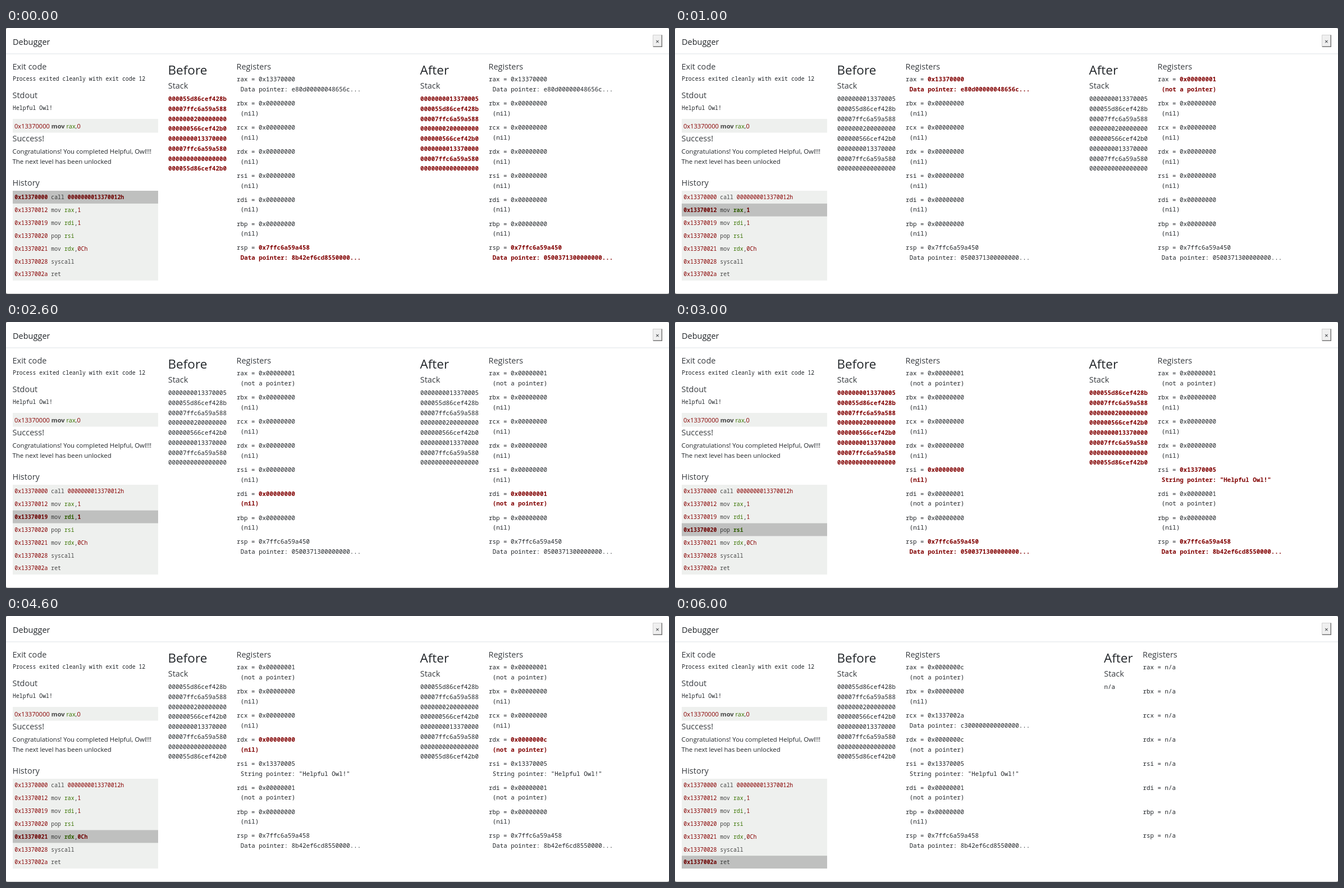
An HTML page that plays this animation: 1181 px wide and 474 px high, repeating every 7 s.

```html
<!DOCTYPE html>
<html lang="en">
<head>
<meta charset="utf-8">
<title>Debugger</title>
<style>
  html, body { margin: 0; width: 100%; height: 100%; overflow: hidden; background: #fff; }
  svg { display: block; }
  text { white-space: pre; fill: #212529; font: 11.45px "Open Sans", "Noto Sans", sans-serif; }
  .title { font-size: 14.5px; }
  .head { font-size: 14.5px; fill: #383c40; }
  .big { font-size: 22.5px; }
  .mono { font: 10.83px "Noto Sans Mono", "DejaVu Sans Mono", monospace; }
  .code { font: 9.85px "Noto Sans Mono", "DejaVu Sans Mono", monospace; }
  .asm { font-size: 11.1px; }
  .changed { font-weight: bold; fill: #800000; }
  .num { fill: #880000; }
  .reg { fill: #397300; }
  .op { fill: #444; }
  .bold, .active .num, .active .reg { font-weight: bold; }
</style>
</head>
<body>
<svg id="stage" width="1181" height="474" viewBox="0 0 1181 474">
  <rect width="1181" height="474" fill="#808080"/>
  <rect width="1181" height="473.5" rx="3" fill="#fff"/>
  <path d="M0 46H1181" stroke="#dee2e6"/>
  <rect x="1152" y="12" width="17" height="22" fill="#efefef"/>
  <path d="M1152.5 34V12.5H1169" fill="none" stroke="#d0d0d0"/>
  <path d="M1153 33.3H1168.3V12.5" fill="none" stroke="#767676" stroke-width="1.5"/>
  <g id="fixed"></g>
  <g id="live"></g>
</svg>
<script>
const STEP_MS = 1000;
const LINE = 17.75, REG_PITCH = 42.86, ROW = 22.86, HISTORY_TOP = 290;
const MESSAGE = "Helpful Owl!", LEVEL = "Helpful, Owl!";

const program = [
  ["0x13370000", "call", "", "0000000013370012h"],
  ["0x13370012", "mov", "rax", "1"],
  ["0x13370019", "mov", "rdi", "1"],
  ["0x13370020", "pop", "rsi", ""],
  ["0x13370021", "mov", "rdx", "0Ch"],
  ["0x13370028", "syscall", "", ""],
  ["0x1337002a", "ret", "", ""]
];

const stackWords = ["13370005", "55d86cef428b", "7ffc6a59a588", "200000000", "566cef42b0",
  "13370000", "7ffc6a59a580", "0", "55d86cef42b0"].map(w => w.padStart(16, "0"));

const NIL = "0x00000000", STACK_LOW = "0x7ffc6a59a450", STACK_HIGH = "0x7ffc6a59a458";
const notes = {
  [NIL]: "(nil)",
  "0x13370000": "Data pointer: e80d00000048656c...",
  "0x13370005": `String pointer: "${MESSAGE}"`,
  "0x1337002a": "Data pointer: c300000000000000...",
  [STACK_LOW]: "Data pointer: 0500371300000000...",
  [STACK_HIGH]: "Data pointer: 8b42ef6cd8550000..."
};

const registers = ["rax", "rbx", "rcx", "rdx", "rsi", "rdi", "rbp", "rsp"];
const initial = Object.fromEntries(registers.map(r => [r, NIL]));
Object.assign(initial, { rax: "0x13370000", rsp: STACK_HIGH });

// Register writes made by each instruction; the last one has no state after it.
const writes = [
  { rsp: STACK_LOW },
  { rax: "0x00000001" },
  { rdi: "0x00000001" },
  { rsi: "0x13370005", rsp: STACK_HIGH },
  { rdx: "0x0000000c" },
  { rax: "0x0000000c", rcx: "0x1337002a" }
];
const states = [initial];
for (const w of writes) states.push({ ...states[states.length - 1], ...w });

const text = (x, y, cls, body) => `<text x="${x}" y="${y}" class="${cls}">${body}</text>`;
const span = (cls, body) => body && `<tspan class="${cls}">${body}</tspan>`;

function operands(reg, num) {
  return span("reg", reg) + (reg && num ? span("op", ",") : "") + span("num", num);
}

function drawFixed() {
  return text(12, 29.5, "title", "Debugger") +
    text(1157.3, 28, "asm", "×") +
    text(11.5, 73.5, "head", "Exit code") +
    text(12, 94, "code", "Process exited cleanly with exit code 12") +
    text(11.5, 125.3, "head", "Stdout") +
    text(12, 145.7, "code", MESSAGE) +
    `<rect x="12" y="162" width="259" height="24.5" fill="#eef0ee"/>` +
    text(15, 178.7, "asm", span("num", "0x13370000") + " " + span("op bold", "mov") + " " + operands("rax", "0")) +
    text(11.5, 202.3, "head", "Success!") +
    text(11.5, 224.3, "", `Congratulations! You completed ${LEVEL}!!`) +
    text(11.5, 242, "", "The next level has been unlocked") +
    text(11.5, 281, "head", "History") +
    `<rect x="12" y="${HISTORY_TOP}" width="259" height="${ROW * 7}" fill="#eef0ee"/>`;
}

function drawHistory(step) {
  const rows = program.map(([addr, op, reg, num], i) =>
    text(15.3, HISTORY_TOP + i * ROW + 15.2, i === step ? "code active" : "code",
      span("num", addr) + " " + span("op", op) + " " + operands(reg, num)));
  return rows.join("") +
    `<rect x="12" y="${HISTORY_TOP + step * ROW}" width="259" height="${ROW}" opacity=".2"/>`;
}

function drawPanel(title, x, regX, state, other) {
  const differs = key => state && other && state[key] !== other[key] ? "changed" : "";
  let out = text(x - .5, 82.5, "big", title) + text(x - .3, 107.6, "head", "Stack") +
    text(regX - .5, 73.5, "head", "Registers");

  const offset = state && state.rsp === STACK_HIGH ? 1 : 0;
  const words = state ? stackWords.slice(offset, offset + 8) : ["n/a"];
  words.forEach((word, i) => {
    out += text(x, 130.2 + i * LINE, "mono " + differs("rsp"), word);
  });

  registers.forEach((name, i) => {
    const y = 95.4 + i * REG_PITCH, value = state ? state[name] : "n/a", cls = differs(name);
    out += text(regX, y, "mono", name + " = " + span(cls, value));
    if (state) out += text(regX + 6.8, y + LINE, "mono " + cls, notes[value] || "(not a pointer)");
  });
  return out;
}

const live = document.getElementById("live");
document.getElementById("fixed").innerHTML = drawFixed();
let shown = -1;

function draw(ms) {
  const step = Math.floor(ms / STEP_MS) % program.length;
  if (step === shown) return;
  shown = step;
  const before = states[step], after = states[step + 1];
  live.innerHTML = drawHistory(step) +
    drawPanel("Before", 289, 411, before, after) +
    drawPanel("After", after ? 738 : 764.5, after ? 860 : 833.5, after, before);
}

const start = performance.now();
function tick() {
  draw(performance.now() - start);
  requestAnimationFrame(tick);
}
tick();
</script>
</body>
</html>
```
